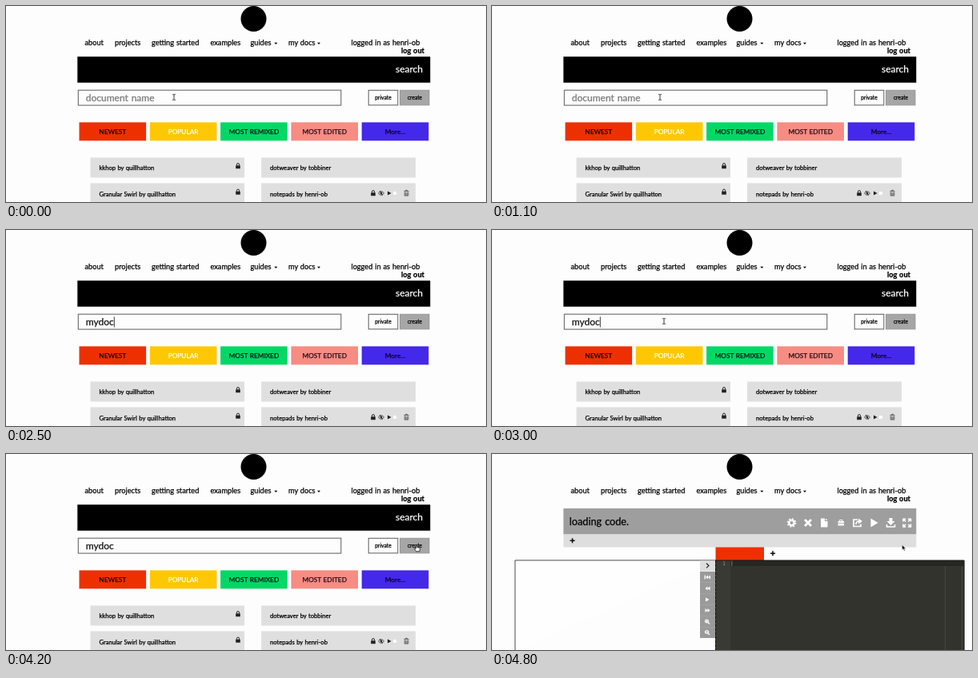
An HTML page that plays this animation: 600x245 px, repeating every 4900 ms.

```html
<!DOCTYPE html>
<html lang="en">
<head>
<meta charset="utf-8">
<title>Create a document</title>
<style>
  html, body { margin: 0; width: 100%; height: 100%; overflow: hidden; background: #fdfdfd; }
  svg { display: block; width: 600px; height: 245px; }
  text {
    font-family: Lato, "Open Sans", sans-serif; word-spacing: .06em;
    fill: currentColor; stroke: currentColor; stroke-width: .25px;
  }
  .nav { font-size: 9.2px; }
  .field { font-size: 12px; }
  .small { font-size: 6.7px; text-anchor: middle; }
  .tab { font-size: 8.3px; text-anchor: middle; }
  .item { font-size: 7.6px; }
  .icon { fill: none; stroke: #fff; stroke-width: 2; }
  .solid { fill: #fff; stroke: none; }
  .tool { fill: #fff; stroke: none; }
  .line { fill: none; stroke: #fff; stroke-width: 1.2; }
</style>
</head>
<body>
<svg viewBox="0 0 600 245">
  <defs>
    <g id="lock">
      <path d="M-1.6 -.5V-1.8a1.6 1.6 0 0 1 3.2 0V-.5" fill="none" stroke="#222"/>
      <rect x="-2.8" y="-.7" width="5.6" height="4" rx=".5" fill="#222"/>
    </g>
    <path id="plus" d="M-3 0H3M0 -3V3" stroke="#111" stroke-width="1.6"/>
    <path id="play" d="M-2 -2.6L2.6 0L-2 2.6z"/>
    <path id="forward" d="M-3 -2.4L0 0L-3 2.4zM0 -2.4L3 0L0 2.4z"/>
    <g id="lens"><circle cx="-.5" cy="-.5" r="2"/><path d="M1 1L3 3M-1.5 -.5H.5"/></g>
  </defs>

  <circle cx="309.5" cy="16" r="16"/>
  <g class="nav">
    <text x="98.5" y="49">about</text>
    <text x="136" y="49">projects</text>
    <text x="182" y="49">getting started</text>
    <text x="255.5" y="49">examples</text>
    <text x="305.5" y="49">guides</text>
    <text x="353" y="49">my docs</text>
    <path d="M335.3 45.8h4l-2 2.2zM389 45.8h4l-2 2.2z"/>
    <text x="431.5" y="49">logged in as henri-ob</text>
    <text x="523" y="58.5" text-anchor="end" font-weight="700">log out</text>
  </g>

  <g id="listPage">
    <rect x="89.3" y="63.3" width="441" height="32.5"/>
    <text class="field" x="521" y="83.3" text-anchor="end" color="#fff">search</text>
    <rect x="90.3" y="105.2" width="328.5" height="18.9" fill="#fdfdfd" stroke="#5c5c5c"/>
    <text id="entry" class="field" x="99.8" y="118.5"></text>
    <path id="caret" d="M0 108.5V121.5" stroke="#222" stroke-width=".9"/>
    <rect x="453.2" y="105.3" width="36.6" height="18.6" fill="#fdfdfd" stroke="#5c5c5c"/>
    <rect x="492.5" y="105.3" width="36.5" height="18.6" fill="#a6a6a6" stroke="#999"/>
    <text class="small" x="471.5" y="117">private</text>
    <text class="small" x="511" y="117">create</text>
    <g id="tabs"></g>
    <path d="M105.5 189.5h192.5v25h-192.5zM319 189.5h193v25h-193zM105.5 221.5h192.5v24h-192.5zM319 221.5h193v24h-193z" fill="#dfdfdf"/>
    <g class="item">
      <text x="116.5" y="204.8">kkhop by quillhatton</text>
      <text x="330" y="204.8">dotweaver by tobbiner</text>
      <text x="116.5" y="237.5">Granular Swirl by quillhatton</text>
      <text x="330" y="237.5">notepads by henri-ob</text>
    </g>
    <use href="#lock" x="290" y="200"/>
    <use href="#lock" x="290" y="232.5"/>
    <use href="#lock" x="459" y="234"/>
    <path d="M465.5 234q3.5 -4.5 7 0q-3.5 4.5 -7 0M467 231l3.6 6" fill="none" stroke="#222" stroke-width=".8"/>
    <circle cx="469" cy="234" r="1.3" fill="#222"/>
    <use href="#play" x="479" y="234" fill="#222"/>
    <rect x="483.5" y="231.5" width="5" height="5" rx="1" fill="#fff" stroke="#ccc" stroke-width=".5"/>
    <path d="M497.5 231.6h6M499.3 231.2v-.9h2.4v.9M498.2 232.5v4.6h4.6v-4.6M499.8 233v4M501.2 233v4" fill="none" stroke="#555" stroke-width=".9"/>
  </g>

  <g id="codePage">
    <rect x="89.3" y="68" width="441" height="32.5" fill="#9e9e9e"/>
    <rect x="89.3" y="100.5" width="441" height="16" fill="#dedede"/>
    <text x="96.8" y="89" font-size="12.7">loading code.</text>
    <use href="#plus" x="100.5" y="108.3"/>
    <g class="icon">
      <circle cx="374.5" cy="86" r="3.2" stroke-width="2.4"/>
      <circle cx="374.5" cy="86" r="4.9" stroke-width="1.8" stroke-dasharray="1.92 1.92"/>
      <path d="M391 82l8 8M399 82l-8 8" stroke-width="2.8"/>
      <path class="solid" d="M411 80.5h5v3.5h3.5v7.5h-8.5zM417 80.5l2.5 2.5h-2.5z"/>
      <path class="solid" d="M432.5 84h7.5v2h-7.5zM432.5 86.8h7.5v2.7h-7.5z"/>
      <path d="M434.5 84v-1.5h3.5v1.5" stroke-width="1"/>
      <path d="M457 82h-5v8.5h9v-3M455 88q0 -4 4 -4" stroke-width="1.7"/>
      <path class="solid" d="M458 80.5l5 3.5l-5 3.5z"/>
      <path class="solid" d="M473.5 80.5l9 5.5l-9 5.5z"/>
      <path class="solid" d="M496.5 80h4v4h3l-5 5l-5 -5h3z"/>
      <path d="M493.5 88v3h10v-3" stroke-width="1.6"/>
      <path d="M514 84.5v-3.3h3.3M520 81.2h3.5v3.3M523.5 87.5v3.5h-3.5M517.3 91h-3.3v-3.5M514 81.2l3.2 3.2M523.5 81.2l-3.2 3.2M523.5 91l-3.2 -3.2M514 91l3.2 -3.2" stroke-width="1.5"/>
    </g>
    <rect x="279.5" y="116.5" width="60.5" height="16.5" fill="#ee3000"/>
    <use href="#plus" x="351" y="124.3"/>
    <path d="M28.9 246V132.9H279.5" fill="#fefefe" stroke="#4c4c4c"/>
    <rect x="260" y="133.5" width="19" height="13" fill="#dedede"/>
    <rect x="260" y="147" width="19" height="83" fill="#9a9a9a"/>
    <path d="M260 160.5h19M260 174.5h19M260 188.5h19M260 202.5h19M260 216.5h19" stroke="#a8a8a8" stroke-width=".7"/>
    <path d="M268 136.8l3 2.8l-3 2.8" fill="none" stroke="#222" stroke-width="1.2"/>
    <g class="tool">
      <use href="#forward" transform="translate(270 154) scale(-1 1)"/>
      <rect x="265.5" y="151.6" width="1.3" height="4.8"/>
      <use href="#forward" transform="translate(269.5 168) scale(-1 1)"/>
      <use href="#play" x="269" y="182"/>
      <use href="#forward" x="269.5" y="195.5"/>
    </g>
    <g class="line">
      <use href="#lens" x="269" y="209.5"/>
      <path d="M268.5 208v2"/>
      <use href="#lens" x="269" y="223"/>
    </g>
    <rect x="279" y="133" width="311" height="113" fill="#32332d"/>
    <rect x="279" y="133" width="19" height="113" fill="#383a33"/>
    <rect x="298" y="133" width="292" height="7" fill="#262723"/>
    <path d="M566.5 140V245M587.5 140V245" stroke="#4c4d46" stroke-width=".8"/>
    <path d="M279 133H590.2V246" fill="none" stroke="#161616"/>
    <path d="M279.5 133V245" stroke="#111" stroke-dasharray="3 2"/>
    <path d="M299.8 133.5V140" stroke="#999" stroke-width=".7"/>
    <text x="288" y="138.6" font-size="6.5" color="#8f908a" style="font-family:'DejaVu Sans Mono',monospace;stroke:none">1</text>
  </g>

  <g id="pointer">
    <path id="beam" d="M-1.8 -3.6Q0 -3.6 0 -2.6Q0 -3.6 1.8 -3.6M0 -2.6V2.6M-1.8 3.6Q0 3.6 0 2.6Q0 3.6 1.8 3.6" fill="none" stroke="#222" stroke-width=".9"/>
    <path id="hand" d="M-1.2 -3.5q.8 -.9 1.5 0v2.6l3 .7q.8 .3 .7 1.2l-.6 3.3h-4l-2.8 -3.4q.4 -1.2 2.2 .2z" fill="#fff" stroke="#111" stroke-width=".8"/>
    <path id="arrow" d="M0 0v6.5l1.5 -1.4l1.1 2.5l1.2 -.5l-1.1 -2.4h2.1z" fill="#111" stroke="#fff" stroke-width=".5"/>
  </g>
</svg>
<script>
const LOOP = 4900, STEP = 100;
const byId = id => document.getElementById(id);
const show = (id, on) => byId(id).setAttribute("visibility", on ? "visible" : "hidden");

byId("tabs").innerHTML = [
  ["NEWEST", "#ee3000", "#1c0600"],
  ["POPULAR", "#fdc800", "#fff"],
  ["MOST REMIXED", "#00d865", "#111"],
  ["MOST EDITED", "#f78c82", "#111"],
  ["More...", "#4429ea", "#080418"]
].map(([label, fill, ink], i) => {
  const x = 91.5 + i * 88.3;
  return `<rect x="${x}" y="145.4" width="83.6" height="23" fill="${fill}"/>
    <text class="tab" x="${x + 41.8}" y="160" color="${ink}">${label}</text>`;
}).join("");

// Each entry: start time, then the values that hold from there on.
const typing = [[0, ""], [1200, "m"], [1400, "my"], [1700, "myd"], [1900, "mydo"], [2100, "mydoc"]];
const blink = [[0, false], [1200, true], [2600, false], [3000, true], [3500, false], [4000, true], [4200, false]];
const moves = [
  [0, "beam", 210, 114], [1200, ""], [2600, "beam", 215, 114], [3100, "beam", 330, 114],
  [3200, "hand", 522, 117], [3500, "hand", 518, 117], [3600, "hand", 513.5, 117.5],
  [4400, "arrow", 512.5, 113.5]
];
const at = (track, t) => track.findLast(([start]) => t >= start);

function draw(now) {
  const t = Math.floor(now % LOOP / STEP) * STEP;
  const coding = t >= 4400;
  byId("listPage").style.display = coding ? "none" : "";
  byId("codePage").style.display = coding ? "" : "none";

  const entry = byId("entry"), typed = at(typing, t)[1];
  entry.textContent = typed || "document name";
  entry.setAttribute("color", typed ? "#111" : "#777");
  show("caret", !coding && at(blink, t)[1]);
  if (typed && !coding) {
    byId("caret").setAttribute("transform", `translate(${100.3 + entry.getComputedTextLength()})`);
  }

  const [, shape, x = 0, y = 0] = at(moves, t);
  for (const id of ["beam", "hand", "arrow"]) show(id, id === shape);
  byId("pointer").setAttribute("transform", `translate(${x} ${y})`);
}

const begin = performance.now();
function tick() {
  draw(performance.now() - begin);
  requestAnimationFrame(tick);
}
tick();
</script>
</body>
</html>
```
